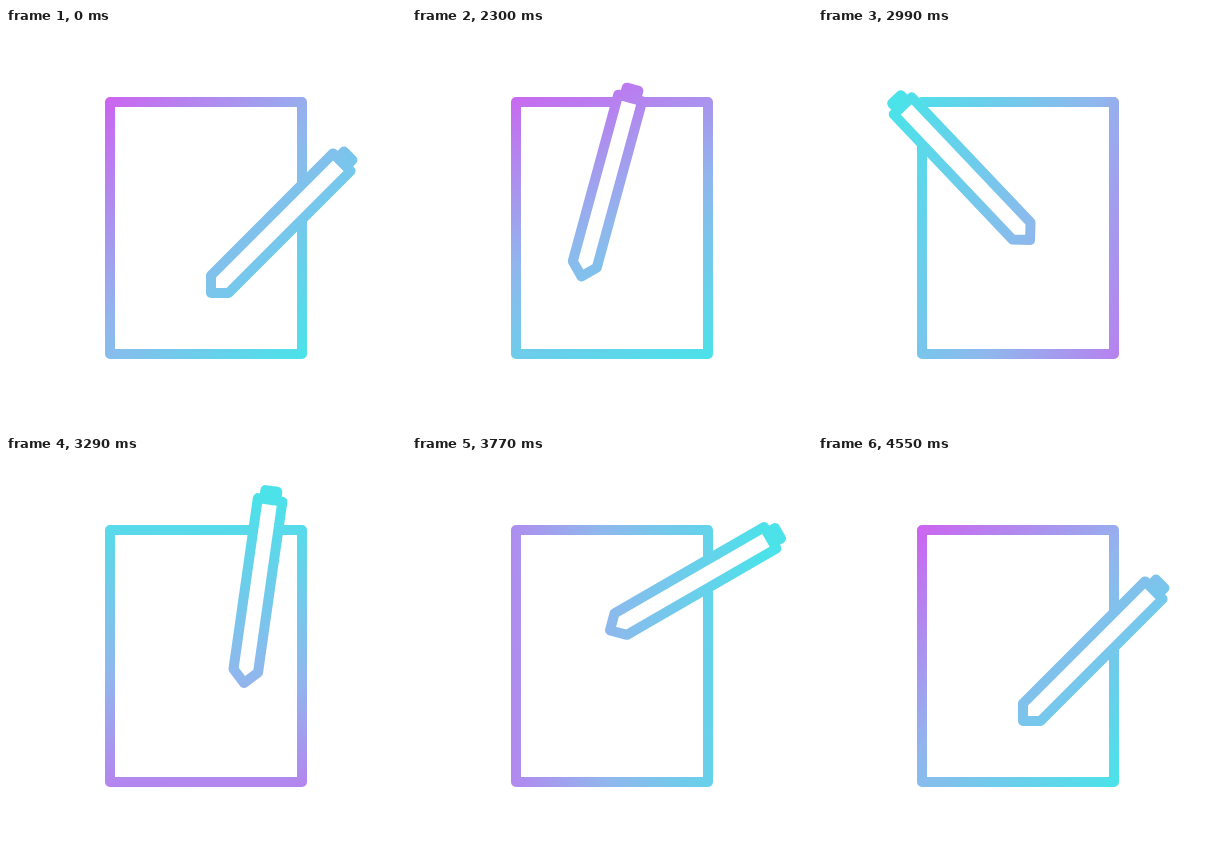
An HTML page that plays this animation: 400 px wide and 400 px high, repeating every 4640 ms.

```html
<!DOCTYPE html>
<html lang="en">
<head>
<meta charset="utf-8">
<title>Pen and paper</title>
<style>
  html, body { margin: 0; width: 100%; height: 100%; overflow: hidden; background: #fff; }
  svg { display: block; width: 100%; height: 100%; }
</style>
</head>
<body>
<svg viewBox="0 0 400 400">
  <defs>
    <linearGradient id="ink" gradientUnits="userSpaceOnUse">
      <stop offset="0" stop-color="#cb65f0"/>
      <stop offset=".5" stop-color="#90b7ed"/>
      <stop offset="1" stop-color="#4be2e9"/>
    </linearGradient>
  </defs>
  <g fill="#fff" stroke="url(#ink)" stroke-width="10" stroke-linejoin="round">
    <path d="M104 74H296V326H104Z"/>
    <path id="cap"/>
    <path id="body"/>
  </g>
</svg>
<script>
  const LOOP = 4640, REST = 2000, END = 4550, STEP = 30;
  const HALF = 12.4, MID = 97;
  const $ = id => document.getElementById(id);
  const rad = deg => deg * Math.PI / 180;
  const smooth = u => u * u * (3 - 2 * u);

  // Key poses: time, middle of the pen, tilt clockwise from upright
  const poses = [
    [REST, 273.6, 196.4, 45],
    [2660, 94, 105, -34],
    [2990, 145.3, 141.7, -43.5],
    [3290, 251.7, 131, 8.1],
    [3770, 282, 125.8, 60],
    [4140, 287.5, 203, 67.5],
    [END, 273.6, 196.4, 45]
  ];

  // Smooth curve through the poses, at rest at both ends
  function slope(i, c) {
    if (i === 0 || i === poses.length - 1) return 0;
    const [a, b, d] = poses.slice(i - 1, i + 2);
    const h0 = b[0] - a[0], h1 = d[0] - b[0];
    return ((b[c] - a[c]) / h0 * h1 + (d[c] - b[c]) / h1 * h0) / (h0 + h1);
  }

  function poseAt(t) {
    let i = 0;
    while (i < poses.length - 2 && t > poses[i + 1][0]) i++;
    const a = poses[i], b = poses[i + 1], h = b[0] - a[0];
    const u = (t - a[0]) / h, v = 1 - u;
    return [1, 2, 3].map(c => smooth(v) * a[c] + smooth(u) * b[c]
      + h * u * v * (v * slope(i, c) - u * slope(i + 1, c)));
  }

  // Outline points: [sideways, distance from the tip]
  const bodyShape = [[0, 0], [-HALF, HALF], [-HALF, 185], [HALF, 185], [HALF, HALF]];
  const capShape = [[-6, 185], [-6, 194], [6, 194], [6, 185]];

  function outline(shape, [x, y, tilt]) {
    const s = Math.sin(rad(tilt)), c = Math.cos(rad(tilt));
    return 'M' + shape.map(([w, d]) =>
      (x + (d - MID) * s + w * c).toFixed(2) + ' ' + (y - (d - MID) * c + w * s).toFixed(2)).join('L') + 'Z';
  }

  // The gradient makes one full turn; its violet end reaches further out on the way
  function turnInk(t) {
    const p = smooth(1 - Math.pow(1 - (t - REST) / (END - REST), 1.25));
    const s = Math.sin(rad(360 * p - 45)), c = Math.cos(rad(360 * p - 45));
    const reach = 160 + 45 * Math.sin(Math.PI * p);
    const ends = { x1: 200 + reach * s, y1: 200 - reach * c, x2: 200 - 160 * s, y2: 200 + 160 * c };
    for (const k in ends) $('ink').setAttribute(k, ends[k].toFixed(2));
  }

  function draw(ms) {
    const steps = Math.floor((ms % LOOP - REST) / STEP);
    const t = Math.min(END, REST + Math.max(0, steps) * STEP);
    const pose = poseAt(t);
    $('cap').setAttribute('d', outline(capShape, pose));
    $('body').setAttribute('d', outline(bodyShape, pose));
    turnInk(t);
  }

  const begin = performance.now();
  function tick() {
    draw(performance.now() - begin);
    requestAnimationFrame(tick);
  }
  tick();
</script>
</body>
</html>
```
